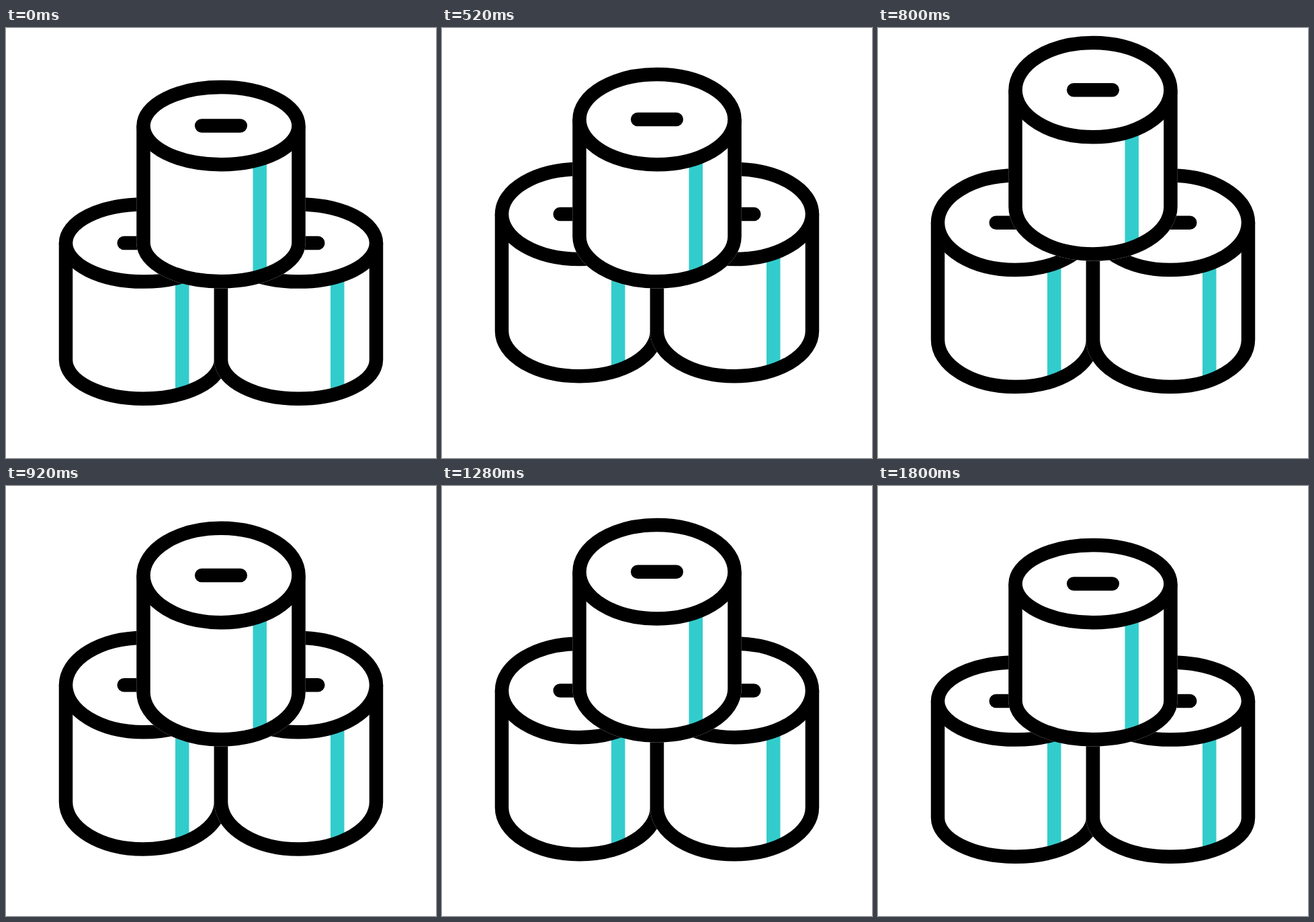
An HTML page for the animation above (1.92 s loop, 640 px wide and 640 px high).

```html
<!DOCTYPE html>
<html lang="en">
<head>
<meta charset="utf-8">
<title>Stacked rolls</title>
<style>
  html, body { margin: 0; width: 100%; height: 100%; overflow: hidden; background: #fff; }
  svg { display: block; width: 100vw; height: 100vh; }
  g { fill: none; stroke: #000; stroke-width: 20.5; }
  .back { fill: #fff; stroke: #fff; }
  .stripe { stroke: #3cc; }
  .lid { fill: #fff; }
  .slot { stroke-linecap: round; }
</style>
</head>
<body>
<svg id="stage" viewBox="0 0 640 640"></svg>
<script>
const LOOP = 1920, STEP = 40;
const RX = 115.5, FLAT = 57.6, TILTED = 70.2, HEIGHT = 174.1;
const HOP = 400;

// base: lowest point of the outline's centre line at rest
const rolls = [
  { x: 204.5, base: 551.7, start: 440, hops: [57, 19.1, 11] },
  { x: 435.5, base: 551.7, start: 440, hops: [57, 19.1, 11] },
  { x: 320, base: 377.3, start: 520, hops: [50.5, 18.6, 11] }
];

const stage = document.getElementById('stage');

function add(parent, tag, cls) {
  const el = document.createElementNS('http://www.w3.org/2000/svg', tag);
  if (cls) el.setAttribute('class', cls);
  return parent.appendChild(el);
}

for (const roll of rolls) {
  const g = add(stage, 'g');
  roll.parts = {};
  for (const name of ['back', 'stripe', 'side', 'lid', 'slot']) {
    roll.parts[name] = add(g, 'path', name);
  }
}

function ease(t, from, to) {
  const p = Math.min(1, Math.max(0, (t - from) / (to - from)));
  return p * p * p * (p * (6 * p - 15) + 10);
}

function lift(roll, t) {
  const n = (t - roll.start) / HOP, i = Math.floor(n);
  return i in roll.hops ? roll.hops[i] * Math.sin(Math.PI * (n - i)) : 0;
}

function pose(roll, t, ry) {
  const foot = roll.base - lift(roll, t) - ry;
  const top = foot - HEIGHT;
  const left = roll.x - RX, right = roll.x + RX;
  const arc = `A${RX} ${ry} 0 0 0 `;
  const side = `M${left} ${top}V${foot}${arc}${right} ${foot}V${top}`;
  const paths = {
    back: side,
    side,
    stripe: `M${roll.x + RX / 2} ${top}V${foot + ry * 0.866}`,
    lid: `M${left} ${top}${arc}${right} ${top}${arc}${left} ${top}Z`,
    slot: `M${roll.x - 28.8} ${top}h57.6`
  };
  for (const name in paths) roll.parts[name].setAttribute('d', paths[name]);
}

function draw(now) {
  const t = Math.floor((now % LOOP) / STEP) * STEP;
  const tilt = ease(t, 160, 720) - ease(t, 1180, 1800);
  const ry = FLAT + (TILTED - FLAT) * tilt;
  for (const roll of rolls) pose(roll, t, ry);
}

let begin;
function tick(now) {
  begin ??= now;
  draw(now - begin);
  requestAnimationFrame(tick);
}
draw(0);
requestAnimationFrame(tick);
</script>
</body>
</html>
```
